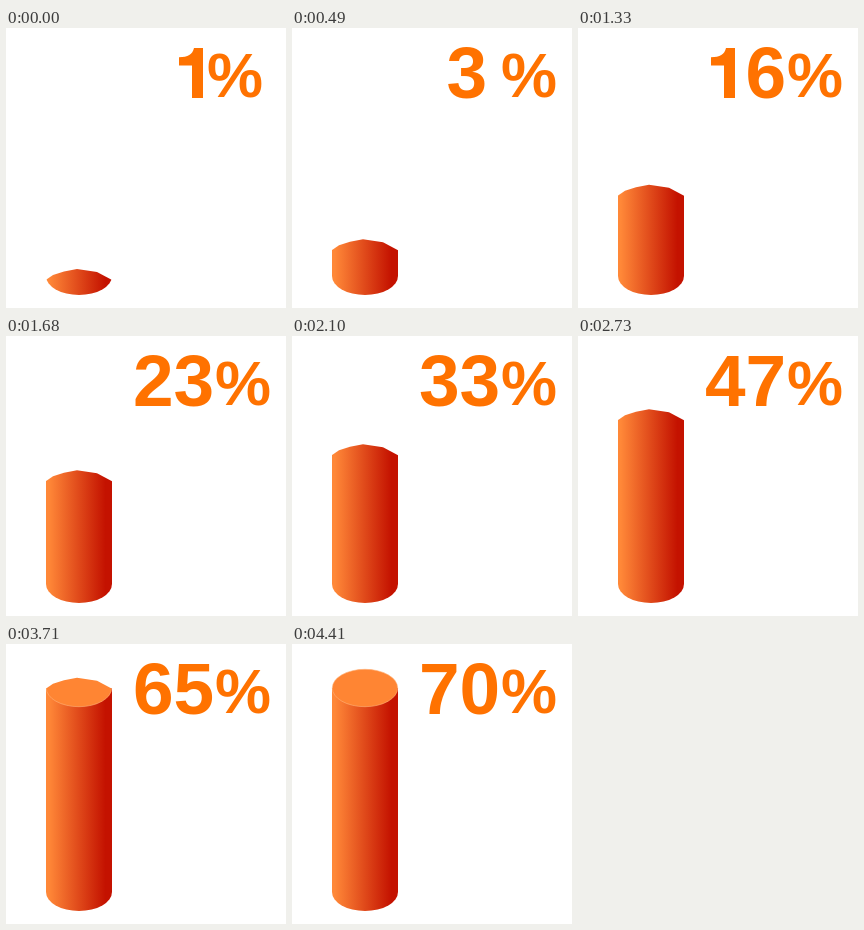
An HTML page that plays this animation: 280x280 px, repeating every 7140 ms.

```html
<!DOCTYPE html>
<html lang="en">
<head>
<meta charset="utf-8">
<title>Rising column</title>
<style>
  html, body { margin: 0; width: 100%; height: 100%; overflow: hidden; background: #fff; }
  svg { display: block; width: 100%; height: 100%; }
  text { font-family: "Liberation Sans", Arial, sans-serif; font-weight: bold; }
</style>
</head>
<body>
<svg viewBox="0 0 280 280">
  <defs>
    <linearGradient id="side">
      <stop offset="0.04" stop-color="#ff8838"/>
      <stop offset="0.9" stop-color="#c41200"/>
    </linearGradient>
    <clipPath id="reveal">
      <path id="edge" d="M39 300V11.5L47 6L58 2.5L71 0L91 3L107 11.5V300Z"/>
    </clipPath>
  </defs>
  <g clip-path="url(#reveal)">
    <path d="M40 44V248A33 19 0 0 0 106 248V44Z" fill="url(#side)"/>
    <ellipse cx="73" cy="44" rx="32.7" ry="18.7" fill="#ff8533" stroke="#ffb27a" stroke-width="0.6"/>
  </g>
  <g fill="#ff7200">
    <g id="number" font-size="73"></g>
    <text id="percent" y="69" font-size="63">%</text>
  </g>
</svg>
<script>
  const LOOP = 7140, TICK = 70, LAST = 63;
  const ADVANCE = 40.6, BASELINE = 70;
  const edge = document.getElementById("edge");
  const number = document.getElementById("number");
  const percent = document.getElementById("percent");

  // The numeral one has no foot, so it is drawn as an outline.
  const one = x =>
    `<path transform="translate(${x} 0)" d="M6 37.5V29.3C15 29 19.5 26.5 21 20H30V70H19V37.5Z"/>`;
  const digit = (d, x) =>
    d === "1" ? one(x) : `<text x="${x}" y="${BASELINE}">${d}</text>`;

  const edgeTop = s => 241 - 152.7 * (Math.sin(0.03 * (s - 16)) + Math.sin(0.48));

  function count(s) {
    const p = 0.0326 + 0.015 * s;
    return Math.max(1, Math.floor(70.1 * (1 - Math.cos(Math.PI * p)) / 2));
  }

  function numberStart(value) {
    if (value === 1) return 167;
    return value < 10 ? 154.5 : 127;
  }

  let shown = -1;
  function draw(time) {
    const s = Math.min(LAST, Math.floor(time % LOOP / TICK));
    if (s !== shown) {
      shown = s;
      const value = count(s), start = numberStart(value);
      edge.setAttribute("transform", `translate(0 ${edgeTop(s).toFixed(2)})`);
      number.innerHTML = [...String(value)]
        .map((d, i) => digit(d, start + i * ADVANCE)).join("");
      percent.setAttribute("x", value === 1 ? 201 : 209);
    }
  }

  const begin = performance.now();
  function loop() {
    draw(performance.now() - begin);
    requestAnimationFrame(loop);
  }
  loop();
</script>
</body>
</html>
```
